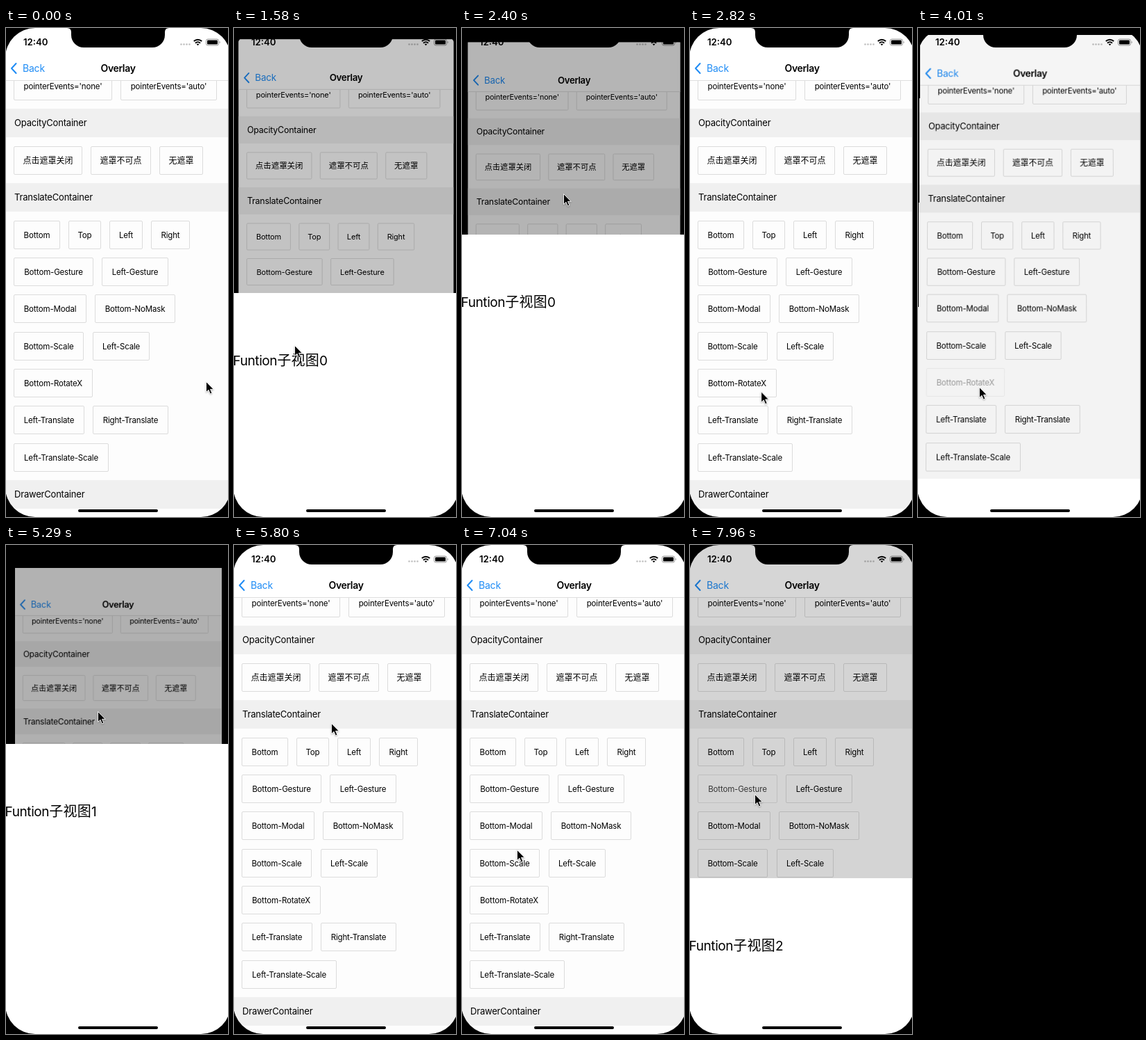
These frames come from a looping animation (320 px wide and 703 px high, 8000 ms). An HTML page:

```html
<!DOCTYPE html>
<html lang="zh-CN">
<head>
<meta charset="utf-8">
<title>Overlay</title>
<style>
html, body { margin: 0; width: 100%; height: 100%; overflow: hidden; background: #000; }
body { position: relative; font-family: Inter, "Noto Sans CJK SC", "Noto Sans CJK", sans-serif; color: #000; }
#stage { position: absolute; left: 0; top: 0; width: 320px; height: 703px; overflow: hidden; background: #000; }
#stage div, #stage svg { position: absolute; box-sizing: border-box; white-space: nowrap; }
#page, #mask, #bezel { left: -1px; top: 0; width: 325px; height: 703px; }
#page { background: #fdfdfd; overflow: hidden; }
#mask { background: #000; }
#list { left: 1px; top: 0; }
.band { left: -1px; width: 325px; height: 41px; padding-left: 13px; line-height: 41px; background: #f0f0f0; font-size: 13px; letter-spacing: -.2px; }
.btn { height: 41px; display: flex; align-items: center; justify-content: center; border: 1px solid #dcdcdc; border-radius: 2px; font-size: 11.5px; letter-spacing: -.17px; }
.cjk { padding-bottom: 2px; font-size: 12px; letter-spacing: 0; }
#head { left: 0; top: 0; width: 325px; height: 76px; background: #fff; border-bottom: 1px solid #dedede; }
#head svg { left: 1px; }
#back, #title { top: 48px; line-height: 20px; font-size: 14px; }
#back { left: 25px; color: #1f8cf5; letter-spacing: -.2px; }
#title { left: 0; width: 325px; text-align: center; font-weight: 600; letter-spacing: -.35px; }
#sheet { left: 0; top: 0; width: 323px; height: 417px; background: #fff; }
#label { left: -1.5px; top: 82px; line-height: 30px; font-size: 20px; letter-spacing: .3px; }
#label .latin { font-size: 19px; letter-spacing: -.4px; }
#clock { left: 25px; top: 12px; line-height: 17px; font-size: 13.2px; font-weight: 600; }
#bezel { border-radius: 43px; box-shadow: 0 0 0 40px #000; }
#home { left: 104px; top: 692px; width: 115px; height: 4px; border-radius: 2px; background: #000; }
#cursor { left: 0; top: 0; overflow: visible; filter: drop-shadow(0 1px 1px rgba(0,0,0,.3)); }
</style>
</head>
<body>
<div id="stage">
  <div id="page">
    <div id="list"></div>
    <div id="head">
      <svg width="24" height="75" fill="none" stroke="#1f8cf5" stroke-width="2" stroke-linecap="round" stroke-linejoin="round"><path d="M14.5 51 8 58l6.500 7"/></svg>
      <div id="back">Back</div>
      <div id="title">Overlay</div>
    </div>
  </div>
  <div id="mask"></div>
  <div id="sheet"><div id="label"><span class="latin">Funtion</span>子视图<span class="latin" id="count">0</span></div></div>
  <div id="clock">12:40</div>
  <svg width="323" height="40">
    <g fill="rgba(0,0,0,.25)"><circle cx="252.500" cy="23.500" r="1.300"/><circle cx="256.500" cy="23.500" r="1.300"/><circle cx="260.500" cy="23.500" r="1.300"/><circle cx="264.500" cy="23.500" r="1.300"/></g>
    <g fill="none" stroke="#000" stroke-width="2"><path d="M270.800 19a8.300 8.300 0 0 1 11.400 0"/><path d="M273 21.700a5 5 0 0 1 7 0"/></g>
    <path d="M274.700 23.300a2.600 2.600 0 0 1 3.600 0L276.500 25.300z"/>
    <rect x="288.500" y="16" width="18" height="9" rx="2.500" fill="none" stroke="rgba(0,0,0,.4)"/>
    <rect x="290" y="17.500" width="15" height="6" rx="1.300"/>
    <path d="M307.700 19a1.600 1.600 0 0 1 0 3z" fill="rgba(0,0,0,.4)"/>
    <path d="M88 0q6 0 6 6v4a18 18 0 0 0 18 18h99a18 18 0 0 0 18-18v-4q0-6 6-6z"/>
  </svg>
  <div id="bezel"></div>
  <div id="home"></div>
  <svg id="cursor" width="12" height="19"><path d="M.5.500V15.500L4 12.300 6.400 18 8.900 17 6.500 11.400H11.200z" stroke="#fff" stroke-width=".9"/></svg>
</div>
<script>
const $ = id => document.getElementById(id);
const LOOP = 8000, HOLD = 7960, SHEET = 417;

const bands = [[116, 'OpacityContainer'], [223, 'TranslateContainer'], [650, 'DrawerContainer']];
// y, then [left, right, label] for each button
const rows = [
  [63, [11, 153, "pointerEvents='none'"], [165, 304, "pointerEvents='auto'"]],
  [170, [11, 110, '点击遮罩关闭'], [122, 209, '遮罩不可点'], [221, 284, '无遮罩']],
  [277, [11, 78, 'Bottom'], [90, 137, 'Top'], [149, 197, 'Left'], [209, 265, 'Right']],
  [330, [11, 126, 'Bottom-Gesture'], [138, 234, 'Left-Gesture']],
  [383, [11, 116, 'Bottom-Modal'], [128, 244, 'Bottom-NoMask']],
  [437, [11, 112, 'Bottom-Scale'], [125, 207, 'Left-Scale']],
  [490, [11, 125, 'Bottom-RotateX']],
  [543, [11, 113, 'Left-Translate'], [125, 234, 'Right-Translate']],
  [597, [11, 148, 'Left-Translate-Scale']]
];

// Each run: button, press time, opening and closing [start, duration], page transform
const runs = [
  { btn: 'Bottom-Scale', press: 1180, open: [1350, 349], close: [2365, 310],
    pose: p => `scale(${1 - .06 * p})` },
  { btn: 'Bottom-RotateX', press: 3720, open: [3928, 322], close: [5450, 310],
    pose: p => `perspective(1000px) rotateX(${18 * Math.min(p, 1 - p)}deg) scale(${1 - .085 * p}, ${1 - .0943 * p})` },
  { btn: 'Bottom-Gesture', press: 7600, open: [7810, 289], close: [9000, 310],
    pose: () => 'none' }
];

// time, x, y
const path = [
  [150, 288, 508], [200, 277, 513], [360, 146, 482], [660, 146, 482], [970, 87, 456],
  [1640, 87, 456], [2080, 146, 238], [2500, 146, 238], [2880, 100, 537], [3150, 100, 537],
  [3600, 88, 516], [4600, 88, 516], [4990, 132, 239], [5680, 132, 239], [5800, 140, 256],
  [5900, 140, 258], [6250, 120, 395], [6280, 120, 395], [6420, 75, 460], [6840, 75, 460],
  [7450, 93, 358]
];

const clamp = v => Math.max(0, Math.min(1, v));
const ease = v => v < .5 ? 2 * v * v : 1 - 2 * (1 - v) ** 2;
const phase = (t, [start, dur]) => ease(clamp((t - start) / dur));

const buttons = {};
function add(cls, text, style) {
  const el = document.createElement('div');
  el.className = cls;
  el.textContent = text;
  el.style.cssText = style;
  $('list').append(el);
  return el;
}
for (const [y, name] of bands) add('band', name, `top:${y}px`);
for (const [y, ...items] of rows)
  for (const [l, r, name] of items)
    buttons[name] = add(/[^\x00-\x7f]/.test(name) ? 'btn cjk' : 'btn', name, `left:${l}px;top:${y}px;width:${r - l}px`);

function cursorAt(t) {
  const i = path.findIndex(k => k[0] > t);
  if (i < 0) return path[path.length - 1].slice(1);
  if (i === 0) return path[0].slice(1);
  const [t0, x0, y0] = path[i - 1], [t1, x1, y1] = path[i];
  const k = ease((t - t0) / (t1 - t0));
  return [x0 + (x1 - x0) * k, y0 + (y1 - y0) * k];
}

function draw(t) {
  const n = t < 3300 ? 0 : t < 6800 ? 1 : 2;
  const run = runs[n];
  const p = phase(t, run.open) - phase(t, run.close);
  $('page').style.transform = p > 0 ? run.pose(p) : 'none';
  $('mask').style.opacity = .3 * p;
  $('sheet').style.transform = `translateY(${Math.round(703 - SHEET * p)}px)`;
  $('count').textContent = n;
  for (const r of runs)
    buttons[r.btn].style.opacity = t < r.press ? 1 : .2 + .8 * phase(t, [r.open[0], 250]);
  const [x, y] = cursorAt(t);
  $('cursor').style.transform = `translate(${x}px, ${y}px)`;
}

const begin = performance.now();
function tick() {
  draw(Math.min((performance.now() - begin) % LOOP, HOLD));
  requestAnimationFrame(tick);
}
tick();
</script>
</body>
</html>
```
